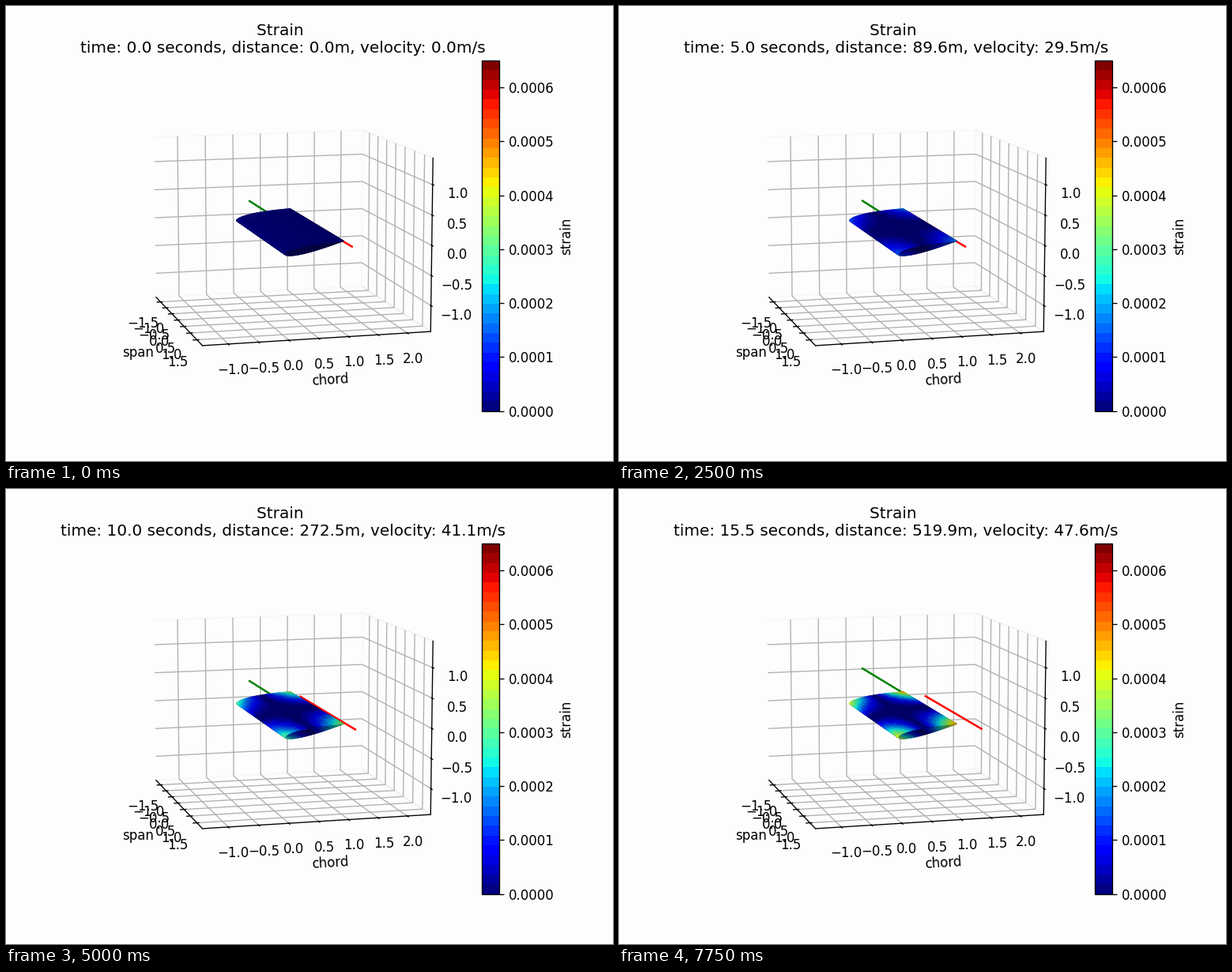
Write a matplotlib script that moves like this. It is 768 by 576 pixels and loops after 8 s.

```python
import numpy as np
import matplotlib.pyplot as plt
from matplotlib.animation import FuncAnimation
from matplotlib.cm import ScalarMappable
from matplotlib.colors import Normalize
from mpl_toolkits.mplot3d.art3d import Poly3DCollection

FRAMES = 32
STEP = 0.5                      # simulated seconds per frame
V_END = 47.6
PAPER = "#fdfdfd"
HALF_SPAN = 1.675
TILT = np.radians(10)
NOSE_Z = -0.074
DRAG_Y, LIFT_Y, LIFT_Z = 1.122, 0.242, 0.266


def run_up():
    """Speed and distance per frame: constant thrust, then constant power."""
    speed, dist = [0.0], [0.0]
    for _ in range(FRAMES - 1):
        v = speed[-1]
        if v < 22:
            v += 3.48 - 0.0006 * v**2
        else:
            v += 55.55 / v - 0.0003365 * v**2
        speed.append(v)
        dist.append(dist[-1] + STEP * v)
    return speed, dist


def section(n=26):
    """Tilted symmetric airfoil, upper trailing edge round to the lower one."""
    a = np.linspace(0, 2 * np.pi, 2 * n + 1)
    c = (1 + np.cos(a)) / 2
    t = 0.6 * (0.2969 * np.sqrt(c) - 0.126 * c - 0.3516 * c**2
               + 0.2843 * c**3 - 0.1036 * c**4)
    t *= np.where(a <= np.pi, 1, -1)
    y = c * np.cos(TILT) - t * np.sin(TILT)
    z = NOSE_Z + c * np.sin(TILT) + t * np.cos(TILT)
    return c, y, z


def mid(a):
    return (a[1:] + a[:-1]) / 2


def build_wing(rows=30):
    c, y, z = section()
    x = np.linspace(-HALF_SPAN, HALF_SPAN, rows + 1)
    quads = [[(x[i], y[j], z[j]), (x[i + 1], y[j], z[j]),
              (x[i + 1], y[j + 1], z[j + 1]), (x[i], y[j + 1], z[j + 1])]
             for i in range(rows) for j in range(len(y) - 1)]
    dy, dz = np.diff(y), np.diff(z)
    lit = (-2 * dz - dy) / (3 * np.hypot(dy, dz))
    light = np.tile(0.65 + 0.35 * lit, rows)
    shape = np.outer(np.abs(mid(x) / HALF_SPAN)**1.4, np.abs(mid(c) - 0.45))
    return quads, light, shape.ravel()


speed, dist = run_up()
quads, light, shape = build_wing()
cmap = plt.get_cmap("jet", 36)
norm = Normalize(0, 0.00065)

fig = plt.figure(figsize=(6.4, 4.8), dpi=120, facecolor=PAPER)
ax = fig.add_subplot(projection="3d", computed_zorder=False, facecolor=PAPER)
ax.view_init(elev=10, azim=-15)
for axis in (ax.xaxis, ax.yaxis, ax.zaxis):
    axis.pane.fill = False
ax.set_xticks(np.arange(-1.5, 1.6, 0.5))
ax.set_yticks(np.arange(-1, 2.1, 0.5))
ax.set_zticks(np.arange(-1, 1.1, 0.5))
ax.set_xlim(-1.912, 1.912)
ax.set_ylim(0.493 - 1.912, 0.493 + 1.912)
ax.set_zlim(-1.434, 1.434)
ax.set_xlabel("span")
ax.set_ylabel("chord")
fig.colorbar(ScalarMappable(norm, cmap), ax=ax, label="strain")

ends = [-HALF_SPAN, HALF_SPAN]
lift, = ax.plot(ends, [LIFT_Y] * 2, [LIFT_Z] * 2, color="green", zorder=2)
drag, = ax.plot(ends, [DRAG_Y] * 2, [0, 0], color="red", zorder=2)
wing = Poly3DCollection(quads, linewidths=0.4, zorder=3,
                        facecolors="navy", edgecolors="navy")
ax.add_collection3d(wing)


def draw(i):
    time = i * STEP
    strain = 0.00093 * (speed[i] / V_END)**2.2 * shape
    colors = cmap(norm(strain))
    colors[:, :3] *= light[:, None]
    wing.set_facecolor(colors)
    wing.set_edgecolor(colors)

    push = 0.28 * (time / 15.5)**3.7
    lift.set_data_3d(ends, [LIFT_Y] * 2, [LIFT_Z + push] * 2)
    drag.set_data_3d(ends, [DRAG_Y + push] * 2, [0, 0])
    ax.set_title(f"Strain \ntime: {time:.1f} seconds, "
                 f"distance: {dist[i]:.1f}m, velocity: {speed[i]:.1f}m/s")
    return wing, lift, drag


anim = FuncAnimation(fig, draw, frames=FRAMES, interval=250,
                     repeat=True, repeat_delay=0, blit=False)
plt.show()
```
